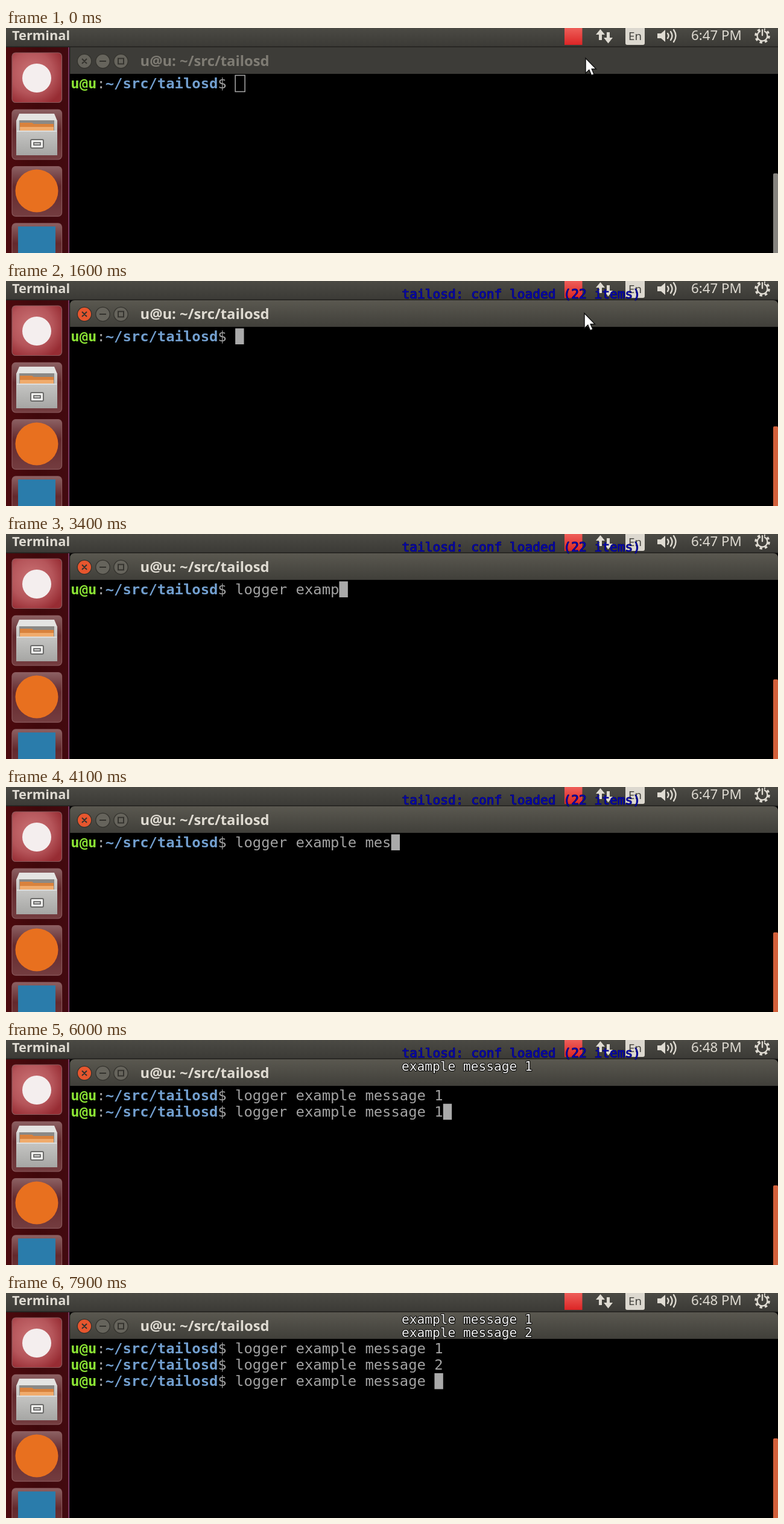
An HTML page for the animation above (8000 ms loop, 1280 by 373 pixels).

```html
<!DOCTYPE html>
<html lang="en">
<head>
<meta charset="utf-8">
<title>Terminal</title>
<style>
html, body { margin: 0; width: 100%; height: 100%; overflow: hidden; background: #000; }
svg { display: block; width: 1280px; height: 373px; }
text { white-space: pre; }
.ui { font: 22.3px "Noto Sans", sans-serif; fill: #dfdbd2; }
.bold { font-weight: 700; }
.term { font: 23.85px "DejaVu Sans Mono", monospace; fill: #a2a2a2; }
.user { font-weight: 700; fill: #8ae234; }
.path { font-weight: 700; fill: #729fcf; }
.osd { font: 21.2px "DejaVu Sans Mono", monospace; fill: #f2f2f2; stroke: #000; stroke-width: 2px; paint-order: stroke; stroke-linejoin: round; }
.info { fill: #0505b0; stroke: #0a0a50; stroke-width: 1.2px; }
.glyph { fill: none; stroke: #34332e; stroke-width: 2; }
.line { fill: none; stroke: #dfdbd2; stroke-width: 2.4; stroke-linecap: round; }
</style>
</head>
<body>
<svg viewBox="0 0 1280 373">
  <defs>
    <linearGradient id="panel" x2="0" y2="1">
      <stop stop-color="#4b4a44"/><stop offset="1" stop-color="#3b3a36"/>
    </linearGradient>
    <linearGradient id="active" x2="0" y2="1">
      <stop stop-color="#5a5850"/><stop offset="1" stop-color="#403f3a"/>
    </linearGradient>
    <linearGradient id="dock">
      <stop stop-color="#4c0a0e"/><stop offset=".5" stop-color="#3f080b"/><stop offset="1" stop-color="#430a10"/>
    </linearGradient>
    <linearGradient id="tile" x2="0" y2="1">
      <stop stop-color="#8c6163"/><stop offset=".4" stop-color="#64292d"/><stop offset="1" stop-color="#743d40"/>
    </linearGradient>
    <radialGradient id="home" cx=".4" cy=".4" r=".7">
      <stop stop-color="#cc7476"/><stop offset=".6" stop-color="#b5555a"/><stop offset="1" stop-color="#972c33"/>
    </radialGradient>
    <linearGradient id="steel" x2="0" y2="1">
      <stop stop-color="#d2d2d0"/><stop offset="1" stop-color="#a6a6a4"/>
    </linearGradient>
    <linearGradient id="red" x2="0" y2="1">
      <stop stop-color="#ee5f59"/><stop offset="1" stop-color="#dc2526"/>
    </linearGradient>
  </defs>

  <rect width="1280" height="373"/>

  <!-- launcher -->
  <rect y="31" width="105" height="342" fill="url(#dock)"/>
  <path d="M104.2 32V373" stroke="#85406f" stroke-width="1.8"/>
  <g id="tiles" stroke="#8a5a5d" stroke-width="1.2"></g>
  <circle cx="51" cy="83" r="24" fill="#f4eeee"/>
  <g>
    <path d="M22 142H80L85 154H17Z" fill="#e4e4e2"/>
    <rect x="17" y="153" width="68" height="20" fill="#8b8986"/>
    <path d="M23 157H43L46 159H79V172H23Z" fill="#d9823c"/>
    <path d="M23 164H79V172H23Z" fill="#f0ab6c"/>
    <path d="M17 153H22V170H80V153H85V211H17Z" fill="url(#steel)"/>
    <path d="M18 171H84" stroke="#e6e6e4" stroke-width="1.5"/>
    <rect x="41" y="185" width="21" height="14" rx="2" fill="#f0f0ee" stroke="#6b6b6a" stroke-width="2"/>
    <rect x="46" y="190" width="11" height="4" fill="#d0d0ce" stroke="#555" stroke-width="1.5"/>
  </g>
  <circle cx="51" cy="270" r="35.5" fill="#e8701f"/>
  <rect x="20" y="329" width="62" height="62" fill="#2a7cab"/>

  <!-- top panel -->
  <rect width="1280" height="31" fill="url(#panel)"/>
  <path d="M0 31.2H1280" stroke="#22211e" stroke-width="1.6"/>
  <text class="ui bold" x="10" y="20" style="font-size:21.8px">Terminal</text>
  <rect x="926" width="29.5" height="28" fill="url(#red)"/>
  <path fill="#dfdbd2" d="M978 11L985.5 2L993 11H988V20H983V11ZM991 16H996V7H1001V16H1006L998.5 25.5Z"/>
  <rect x="1027" y="-2" width="32" height="30" rx="3" fill="#dcd8cf"/>
  <text class="ui" x="1032" y="20" style="font-size:18.8px;font-weight:500;fill:#45443f">En</text>
  <path fill="#dfdbd2" d="M1080 9H1086L1093 3V23L1086 17H1080Z"/>
  <path class="line" d="M1097 9Q1100 13 1097 17M1102 6Q1107 13 1102 20M1107 3Q1114 13 1107 23"/>
  <text id="clock" class="ui" x="1136" y="20"></text>
  <circle class="line" cx="1254" cy="13" r="8.5"/>
  <circle class="line" cx="1254" cy="13" r="11" style="stroke-width:3.6;stroke-linecap:butt" stroke-dasharray="4.32"/>
  <path d="M1254 0V13" stroke="#45443e" stroke-width="6"/>
  <path class="line" d="M1254 3V12"/>

  <!-- window title -->
  <path id="bar"/>
  <g stroke="#34332e" stroke-width="1.3">
    <circle id="close" cx="130" cy="55" r="11.7"/>
    <circle cx="160.500" cy="55" r="11.7" fill="#66645c"/>
    <circle cx="190.500" cy="55" r="11.7" fill="#66645c"/>
  </g>
  <path class="glyph" d="M126 51L134 59M134 51L126 59M155 55H166M186 50.500H195V59.500H186Z"/>
  <text id="title" class="ui bold" x="222.500" y="63" style="font-size:23.800px">u@u: ~/src/tailosd</text>
  <rect id="scroll" x="1272" y="241" width="8" height="134" rx="2"/>

  <g id="lines"></g>
  <rect id="caret"/>

  <text id="info" class="osd info" x="656.500" y="29">tailosd: conf loaded (22 items)</text>
  <text id="msg1" class="osd" x="656" y="51">example message 1</text>
  <text id="msg2" class="osd" x="656" y="73">example message 2</text>

  <path id="mouse" d="M0 0V25L5.800 19.500L9.700 28.500L14 26.600L10.200 18H17.500Z" fill="#fff" stroke="#111" stroke-width="1.4"/>
</svg>
<script>
const LOOP = 8000, CELL = 14.36, ROW = 27.2, LEFT = 107.3, PROMPT = 19;
const BASE = "logger example message ";
const FIRST = BASE + "1", SECOND = BASE + "2";
const SQUARE = "M106 76V32H1280V76Z";
const ROUNDED = "M106 76V40Q106 32 114 32H1272Q1280 32 1280 40V76Z";

// Key times of the typed command: [ms, characters]
const TYPING = [[1800, 0], [1900, 1], [2200, 3], [3400, 12], [4700, 24]];
// Shell history after the first Enter: [ms, row, text]
const SHELL = [
  [5300, 1, ""], [5700, 1, FIRST], [6300, 1, BASE], [6500, 1, SECOND],
  [6900, 2, ""], [7300, 2, SECOND], [7700, 2, BASE]
];

const $ = id => document.getElementById(id);
const set = (el, attrs) => { for (const k in attrs) el.setAttribute(k, attrs[k]); };
const show = (id, on) => { $(id).style.display = on ? "" : "none"; };

function make(tag, parent, attrs, text = "") {
  const el = document.createElementNS("http://www.w3.org/2000/svg", tag);
  set(el, attrs);
  el.textContent = text;
  return parent.appendChild(el);
}

for (let i = 0; i < 4; i++) {
  make("rect", $("tiles"), {
    x: 10, y: 41 + i * 94.3, width: 82.5, height: 82.5, rx: 6,
    fill: i ? "url(#tile)" : "url(#home)"
  });
}

const rows = [0, 1, 2].map(i => {
  const row = make("text", $("lines"), { class: "term", x: LEFT, y: 100 + i * ROW });
  make("tspan", row, { class: "user" }, "u@u");
  make("tspan", row, {}, ":");
  make("tspan", row, { class: "path" }, "~/src/tailosd");
  make("tspan", row, {}, "$ ");
  return { row, input: make("tspan", row, {}) };
});

function typedCount(t) {
  if (t < TYPING[0][0]) return 0;
  for (let i = 1; i < TYPING.length; i++) {
    const [t0, n0] = TYPING[i - 1], [t1, n1] = TYPING[i];
    if (t < t1) return Math.floor(n0 + (n1 - n0) * (t - t0) / (t1 - t0) + 1e-6);
  }
  return FIRST.length;
}

function shellText(t) {
  const text = [FIRST.slice(0, typedCount(t)), null, null];
  for (const [at, row, value] of SHELL) if (t >= at) text[row] = value;
  return text;
}

function draw(t) {
  const focus = t >= 1500;
  set($("bar"), { d: focus ? ROUNDED : SQUARE, fill: focus ? "url(#active)" : "#3d3c38" });
  set($("close"), { fill: focus ? "#e7562e" : "#66645c" });
  set($("scroll"), { fill: focus ? "#d2603a" : "#85837e" });
  $("title").style.fill = focus ? "#dfdbd2" : "#7f7c74";
  $("clock").textContent = t < 4500 ? "6:47 PM" : "6:48 PM";

  let last = 0;
  shellText(t).forEach((value, i) => {
    rows[i].row.style.display = value === null ? "none" : "";
    rows[i].input.textContent = value || "";
    if (value !== null) last = i;
  });
  const column = PROMPT + rows[last].input.textContent.length;
  const x = LEFT + column * CELL, y = 78.5 + last * ROW;
  set($("caret"), focus
    ? { x, y, width: 14.4, height: 26.5, fill: "#aaa", stroke: "none" }
    : { x, y, width: 16, height: 27, fill: "none", stroke: "#aaa", "stroke-width": 1.5 });

  show("info", t >= 500 && t < 6700);
  show("msg1", t >= 5300);
  show("msg2", t >= 6900);

  const move = Math.min(1, t / 800);
  show("mouse", t < 1900);
  set($("mouse"), { transform: `translate(${961 - 2 * move} ${50 + 3.5 * move})` });
}

function tick() {
  draw(Math.floor(performance.now() % LOOP / 100) * 100);
  requestAnimationFrame(tick);
}
tick();
</script>
</body>
</html>
```
